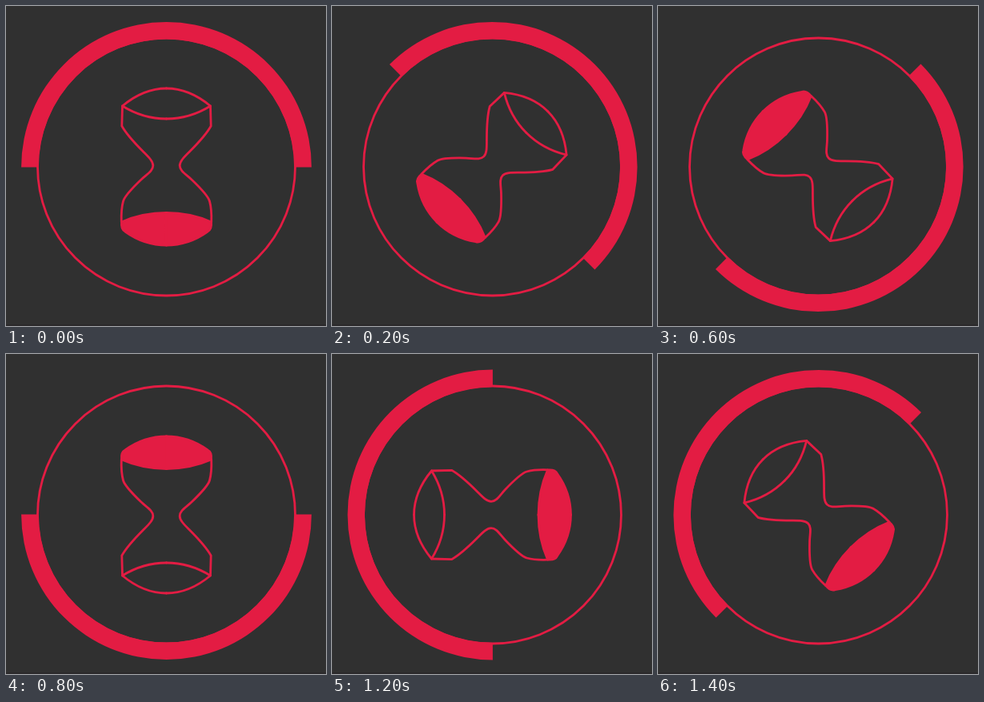
An HTML page with a canvas for the animation above (1600 ms loop, 400 by 400 pixels).

```html
<!DOCTYPE html>
<html>
<head>
<meta charset="utf-8">
<style>
html, body { margin: 0; width: 100%; height: 100%; overflow: hidden; background: #303030; }
canvas { display: block; }
</style>
</head>
<body>
<canvas id="stage" width="400" height="400"></canvas>
<script>
const ctx = document.getElementById('stage').getContext('2d');
const RED = '#e31c43';
const LOOP = 1600, STEPS = 8;

// Hourglass around its centre; each half is mirrored to give the other
const side = new Path2D(
  'M-55-76 L-55.7-51 C-49-39-37-27-29-19 C-22-12-16.7-7-16.7-1.5 ' +
  'C-16.7 5-24 9-31 15.5 C-41 25-52 36-54 43 C-56.7 53-56.5 61-56.2 69');
const lid = new Path2D('M-55-76 C-37-91-19-98 0-98 M-55-76 C-38-65.5-19-60 0-60');
const sand = new Path2D(
  'M.4 57.5 C-19 57.5-39 61.5-56 69 C-56.8 76-55.5 79-51.5 81 C-37 91.5-19 98 .4 98 Z');

function drawGlass() {
  for (const flip of [1, -1]) {
    ctx.save();
    ctx.scale(flip, 1);
    ctx.stroke(side);
    ctx.stroke(lid);
    ctx.fill(sand);
    ctx.stroke(sand);
    ctx.restore();
  }
}

function drawRing() {
  ctx.beginPath();
  ctx.arc(0, 0, 161, 0, Math.PI * 2);
  ctx.stroke();
  ctx.beginPath();
  ctx.arc(0, 0.4, 181.4, Math.PI, 0);
  ctx.arc(0, 0.4, 160, 0, Math.PI, true);
  ctx.closePath();
  ctx.fill();
}

function draw(time) {
  const step = Math.floor((time % LOOP) / LOOP * STEPS);
  ctx.fillStyle = '#303030';
  ctx.fillRect(0, 0, 400, 400);
  ctx.fillStyle = '#2b2a2b';
  ctx.fillRect(0, 398, 400, 2);

  ctx.save();
  ctx.translate(200.5, 201);
  ctx.rotate(step * Math.PI * 2 / STEPS);
  ctx.fillStyle = ctx.strokeStyle = RED;
  ctx.lineWidth = 2.8;
  ctx.lineJoin = ctx.lineCap = 'round';
  drawRing();
  drawGlass();
  ctx.restore();
}

const start = performance.now();
function tick() {
  draw(performance.now() - start);
  requestAnimationFrame(tick);
}
tick();
</script>
</body>
</html>
```
